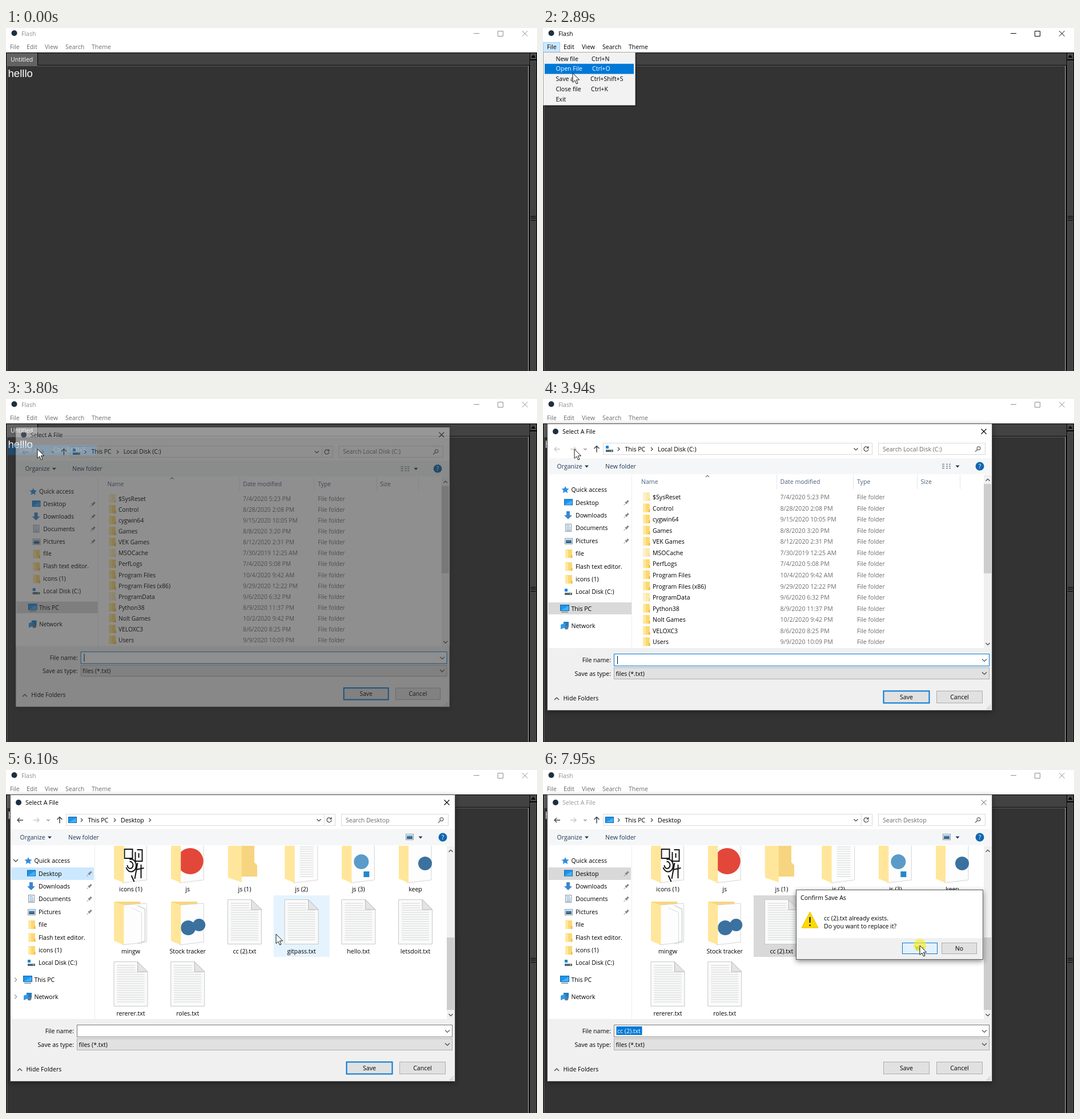
These frames come from a looping animation (930 px wide and 602 px high, 8000 ms). An HTML page:

```html
<!DOCTYPE html>
<html lang="en">
<head>
<meta charset="utf-8">
<title>Flash</title>
<style>
html, body { margin: 0; width: 100%; height: 100%; overflow: hidden; background: #333; }
svg { display: block; width: 930px; height: 602px; }
text { font: 10.55px "Open Sans", "Noto Sans", sans-serif; white-space: pre; }
#frame { filter: drop-shadow(0 2px 4px rgba(0,0,0,.4)); }
#note { filter: drop-shadow(0 3px 5px rgba(0,0,0,.45)); }
</style>
</head>
<body>
<svg id="stage" viewBox="0 0 930 602"></svg>
<script>
const LOOP = 8000;
const $ = id => document.getElementById(id);

// ---- drawing helpers ----
const text = (x, y, s, fill = '#000', more = '') => `<text x="${x}" y="${y}" fill="${fill}" ${more}>${s}</text>`;
const rect = (x, y, w, h, fill, more = '') => `<rect x="${x}" y="${y}" width="${w}" height="${h}" fill="${fill}" ${more}/>`;
const box = (x, y, w, h, fill, line, id = '') => rect(x + .5, y + .5, w - 1, h - 1, fill, `stroke="${line}" ${id && `id="${id}"`}`);
const path = (d, fill, more = '') => `<path d="${d}" fill="${fill}" ${more}/>`;
const line = (d, color, width = 1, more = '') => path(d, 'none', `stroke="${color}" stroke-width="${width}" ${more}`);
const dot = (x, y, r, fill) => `<circle cx="${x}" cy="${y}" r="${r}" fill="${fill}"/>`;
const group = (id, body, more = '') => `<g id="${id}" ${more}>${body}</g>`;
const chevron = (x, y, dir, color = '#444', s = 3) => line({
  down: `M${x - s} ${y - s / 2}l${s} ${s}l${s} ${-s}`,
  up: `M${x - s} ${y + s / 2}l${s} ${-s}l${s} ${s}`,
  right: `M${x - s / 2} ${y - s}l${s} ${s}l${-s} ${s}`
}[dir], color, 1.2);
const button = (x, y, w, h, label, id) =>
  box(x, y, w, h, '#e1e1e1', '#adadad', id) + text(x + w / 2, y + h / 2 + 4, label, '#000', 'text-anchor="middle"');

// ---- editor window ----
const menuX = { File: 7, Edit: 36, View: 68, Search: 104, Theme: 150 };
const editor = rect(0, 0, 930, 43, '#fff') +
  group('fileHot', box(0, 25, 30, 18, '#cce8ff', '#99d1ff')) +
  dot(14.5, 9, 5, '#1c2f40') +
  group('caption', text(27, 13.5, 'Flash', '') +
    line('M819 9.5h10M861.5 5.5h9v9h-9zM904 5l9.5 9.5M913.5 5l-9.5 9.5', 'currentColor')) +
  group('menuBar', Object.entries(menuX).map(([s, x]) => text(x, 37, s, '')).join('')) +
  rect(0, 43, 930, 559, '#000') + rect(0, 44, 917, 21, '#424242') + rect(0, 42, 930, 1, '#f0f0f0') +
  rect(1, 66, 915, 536, '#333') +
  line('M1.5 602V66.5H915', '#686868') + line('M915 66V602', '#b0b0b0') +
  rect(1, 44, 54, 22, '#626262') + line('M.5 66V43.5H55.5V65.5', '#000') +
  text(8, 58.5, 'Untitled', '#fff') +
  text(3.5, 85.5, 'helllo', '#fff', 'style="font:18.6px \'Liberation Sans\',Arial,sans-serif"') +
  rect(918, 44, 11, 11, '#4a4a4a') + path('M919.5 52l4-5l4 5z', '#000') +
  rect(918, 57, 11, 545, '#424242') + line('M918.5 602V57.5H929', '#5a5a5a') +
  line('M919 330.5h9M919 333.5h9M919 337.5h9', '#000');

// ---- File menu ----
const items = [['New file', 'Ctrl+N', 85], ['Open File', 'Ctrl+O', 86], ['Save as', 'Ctrl+Shift+S', 83], ['Close file', 'Ctrl+K', 84], ['Exit', '', 80]];
const itemText = (i, fill) => text(22.5, 57.5 + 17.8 * i, items[i][0], fill) + text(items[i][2], 57.5 + 17.8 * i, items[i][1], fill);
const menu = group('menu', rect(3, 45, 161, 93, '#000', 'opacity=".3"') + box(0, 42, 162, 94, '#f2f2f2', '#a5a5a5') +
  items.map((_, i) => itemText(i, '#000')).join('')) +
  items.map((_, i) => group('item' + i, rect(3, 45 + 17.8 * i, 156, 17.8, '#0078d7') + itemText(i, '#fff'))).join('');

// ---- file dialog ----
const folder = (x, y, pale) => rect(x, y, 12, 15, pale ? '#fbe9b0' : '#fcd872') +
  path(`M${x} ${y}l5 1.5v14l-5 -1z`, pale ? '#fdf1cc' : '#ffe89c') + rect(x + 10, y + 10, 2.5, 5, pale ? '#f3dc97' : '#edbb4c');
const drive = (x, y) => rect(x, y, 5, 5, '#1a86d8') + rect(x, y + 7, 13, 4, '#5d6770') + rect(x + 9, y + 8, 2, 2, '#6be36b');
const screen = (x, y, w = 15, h = 11) => box(x, y, w, h, '#1d94ea', '#0b62a8') + path(`M${x + 1} ${y + h - 1}L${x + w - 1} ${y + 2}V${y + h - 1}z`, '#45b0f7');
const picture = (x, y) => box(x, y, 14, 11, '#e9f4fb', '#8a98a4') + rect(x + 2, y + 3, 10, 4, '#4a90c8') + rect(x + 2, y + 6, 10, 3, '#3b5b70');
const icons = {
  star: (x, y) => path(`M${x + 6} ${y - 6}l2 4l4.5 .5l-3.3 3l1 4.5l-4.2 -2.3l-4.2 2.3l1 -4.5l-3.3 -3l4.5 -.5z`, '#2d8fe0'),
  desk: (x, y) => screen(x - 1, y - 6),
  down: (x, y) => path(`M${x + 3} ${y - 7}h6v7h4l-7 7l-7 -7h4z`, '#3a87cf'),
  doc: (x, y) => box(x + 1, y - 7, 11, 14, '#fff', '#8493a0') + line(`M${x + 3} ${y - 4}h6M${x + 3} ${y - 1}h7M${x + 3} ${y + 2}h7M${x + 3} ${y + 4.5}h7`, '#4f86b8'),
  pic: (x, y) => picture(x, y - 5),
  dir: (x, y) => folder(x + 1, y - 7),
  disk: (x, y) => drive(x, y - 5),
  pc: (x, y) => screen(x - 3, y - 7, 16, 11) + rect(x - 1, y + 5, 12, 2, '#8fa3b3'),
  net: (x, y) => rect(x + 3, y - 7, 9, 9, '#1f7cc4') + path(`M${x - 2} ${y - 2}l8 -3v8l-8 3z`, '#2f9bea') + dot(x + 8, y + 3, 3.5, '#5a7d96')
};
const places = [['Quick access', 159, 'star'], ['Desktop', 181.5, 'desk'], ['Downloads', 204, 'down'], ['Documents', 226, 'doc'],
  ['Pictures', 249, 'pic'], ['file', 271, 'dir'], ['Flash text editor.', 293.5, 'dir'], ['icons (1)', 316, 'dir'],
  ['Local Disk (C:)', 338, 'disk'], ['This PC', 368, 'pc'], ['Network', 398, 'net']];
const pin = y => path(`M148 ${y - 4.5}l3 3l-1.5 .5l-2 2l-.5 2.5l-4 -4l2.5 -.5l2 -2z`, '#7e858c') + line(`M144.5 ${y + 2}l-3 3`, '#7e858c');
const sidebar = rect(9, 357, 146, 21, '#d9d9d9', 'id="pcBand"') + rect(9, 171, 145, 22, '#cce8ff', 'id="deskBand"') +
  places.map(([name, y, kind], i) => {
    const child = i > 0 && i < 9;
    return icons[kind](child ? 38 : 33, y) + text(child ? 57 : 49.5, y + 4, name) + (i > 0 && i < 5 ? pin(y) : '');
  }).join('') +
  group('twisties', chevron(17, 159, 'down', '#333', 4) + chevron(17, 368, 'right', '#999', 3.5) + chevron(17, 398, 'right', '#999', 3.5));

const rows = `$SysReset|7/4/2020 5:23 PM|1
Control|8/28/2020 2:08 PM
cygwin64|9/15/2020 10:05 PM
Games|8/8/2020 3:20 PM
VEK Games|8/12/2020 2:31 PM
MSOCache|7/30/2019 12:25 AM|1
PerfLogs|7/4/2020 5:08 PM
Program Files|10/4/2020 9:42 AM
Program Files (x86)|9/29/2020 12:22 PM
ProgramData|9/6/2020 6:32 PM|1
Python38|8/9/2020 11:37 PM
Nolt Games|10/2/2020 9:42 PM
VELOXC3|8/6/2020 8:25 PM
Users|9/9/2020 10:09 PM`.split('\n').map(r => r.split('|'));
const head = '#4c607a', faint = '#6d6d6d';
const details = text(172, 149, 'Name', head) + text(415.5, 149, 'Date modified', head) + text(550, 149, 'Type', head) +
  text(661.5, 149, 'Size', head) + chevron(288, 135.5, 'up', '#777') +
  line('M409.5 133v25M543.5 133v25M655.5 133v25M730.5 133v25', '#e5e5e5') +
  rows.map(([name, date, pale], i) => {
    const y = 172 + 19.57 * i;
    return folder(175, y - 8, pale) + text(192, y + 4, name) + text(415.5, y + 4, date, faint) + text(550, y + 4, 'File folder', faint);
  }).join('');

// ---- desktop tiles ----
const PITCH = 99.7, ROW = 109, VIEW_TOP = 133, MAX_SCROLL = 351;
const ruled = (x, y, w, n, step) => Array.from({ length: n }, (_, i) => line(`M${x} ${y + i * step}h${w}`, '#cbced0', .9)).join('');
const page = path('M-29.5 7.5H12L29.5 25V85.5H-29.5z', '#fafafa', 'stroke="#c8c8c8"') +
  path('M12 7.5V25H29.5z', '#e4e4e4', 'stroke="#b8b8b8"') + ruled(-24, 14, 32, 3, 4) + ruled(-24, 26, 48, 14, 4);
const inside = {
  plain: '',
  sheet: line('M12 18l13 6v56l-13 5', '#cfd4d8', 1.5) + line('M1 22l18 8v56', '#d8dcdf'),
  doodle: line('M-11 28h14v16h-14zM-8 60a9 11 0 1 0 6 -14M-6 56a5 6 0 1 0 4 -6M8 33v16h12V29h-9M12 52l-5 28M18 55v24M9 64l14 -3M1 74l5 11M14 35v8', '#151515', 2),
  red: dot(4.5, 49, 23, '#e2473a'),
  lines: ruled(-3, 24, 24, 14, 4),
  blue: dot(5, 50, 13, '#5b9bc9') + rect(9, 67, 10, 10, '#2489ca'),
  snake: dot(17, 53, 12, '#3b719f'),
  snakes: dot(1, 57, 13, '#3b719f') + dot(20, 52, 11, '#3b719f')
};
const tab = path('M-29 11L-12 17V87L-29 80z', '#ffe69a');
const bigFolder = kind => kind === 'empty'
  ? path('M-29 11H17V51L22 56V76H-29z', '#f6d480') + path('M-29 11L-5 17V86L-29 78z', '#ffe69a')
  : path('M-29 11H17V80H-29z', '#f8d67e') + path('M-14 17L28 14V82L-14 87z', '#fdfdfd', 'stroke="#d5d5d5"') + inside[kind] + tab;
const older = Array.from({ length: 18 }, (_, i) => ['New folder' + (i ? ` (${i + 1})` : ''), i % 3 ? 'sheet' : 'empty']);
const files = older.concat([['icons (1)', 'doodle'], ['js', 'red'], ['js (1)', 'empty'], ['js (2)', 'lines'], ['js (3)', 'blue'], ['keep', 'snake'],
  ['mingw', 'sheet'], ['Stock tracker', 'snakes']], ['cc (2)', 'gitpass', 'hello', 'letsdoit', 'rererer', 'roles'].map(n => [n + '.txt', 'page']));
const CHOSEN = 26;
const tileX = i => 170 + PITCH * (i % 6), tileY = i => 135 + ROW * Math.floor(i / 6);
const tiles = files.map(([name, kind], i) => `<g transform="translate(${tileX(i) + 48.5} ${tileY(i)})">` +
  rect(-49, 0, 98, 108, 'none', `id="tile${i}"`) + (kind === 'page' ? page : bigFolder(kind)) +
  text(0, 102, name, '#000', 'text-anchor="middle"') + '</g>').join('');

const arrow = (x, dir, id) => line(`M${x - 5 * dir} 88h${10 * dir}M${x + dir} 84l${4 * dir} 4l${-4 * dir} 4`, '#c8c8c8', 1.4, id);
const crumbs = place => text(143.5, 91.5, 'This PC') + chevron(132.5, 88, 'right') + chevron(190.5, 88, 'right') + text(201, 91.5, place);
const dialog = box(7, 43, 780, 504, '#f0f0f0', '#555', 'frame') + rect(8, 44, 778, 60, '#fff') +
  dot(22, 57, 5, '#1c2f40') + group('dlgCaption', text(34, 61, 'Select A File', '') + line('M767.5 52.5l9 9M776.5 52.5l-9 9', 'currentColor', 1.1)) +
  arrow(25, -1, 'id="back"') + arrow(53, 1) + chevron(74, 88, 'down', '#888', 2.5) + line('M94 93.5v-11M89.5 87l4.5 -4.5l4.5 4.5', '#444', 1.5) +
  box(105, 77, 472, 21, '#fff', '#d9d9d9') + line('M557.5 78v19', '#d9d9d9') + chevron(548, 88, 'down', '#444', 3.5) +
  line('M569 85a4 4 0 1 0 1 3M570 83v3h-3', '#555', 1.3) +
  box(587, 77, 188, 21, '#fff', '#d9d9d9') + dot(763, 86.5, 3.5, '#666') + dot(763, 86.5, 2.3, '#fff') + line('M760.5 89l-3.5 3.5', '#666', 1.4) +
  rect(8, 104, 778, 28, '#f5f6f7') + text(24.5, 122, 'Organize', '#1e395b') + path('M73 116.5h7l-3.5 4z', '#1e395b') +
  text(109, 122, 'New folder', '#1e395b') + path('M722.5 116.5h7l-3.5 4z', '#1e395b') +
  dot(765, 118, 7.5, '#0f66b0') + text(765, 122, '?', '#fff', 'text-anchor="middle" font-weight="700"') +
  rect(8, 132, 778, 305, '#fff') + line('M155.5 133V437', '#ededed') + sidebar +
  group('drivePage', details + drive(110, 82) + crumbs('Local Disk (C:)') + text(595, 91.5, 'Search Local Disk (C:)', faint) +
    line('M699 114.5h4M699 118h4M699 121.5h4M706 114.5h3M706 118h3M706 121.5h3M711 114.5h3M711 118h3M711 121.5h3', '#7b8794', 1.4)) +
  group('deskPage', `<g clip-path="url(#view)">${group('tiles', tiles)}</g>` + screen(109, 82, 15, 11) + crumbs('Desktop') +
    text(595, 91.5, 'Search Desktop', faint) + picture(700, 112)) +
  group('tail', chevron(0, 88, 'right')) +
  rect(772, 133, 14, 304, '#f0f0f0') + chevron(779, 142, 'up', '#444', 3.5) + chevron(779, 430, 'down', '#444', 3.5) +
  rect(772, 149, 13, 119, '#cdcdcd', 'id="thumb"') +
  text(119, 462, 'File name:', '#000', 'text-anchor="end"') + box(124, 447, 658, 22, '#fff', '#0078d7', 'nameBox') +
  rect(128.5, 450, 45, 15, '#0078d7', 'id="nameMark"') + text(130, 461.5, 'cc (2).txt', '#000', 'id="nameText"') +
  rect(130, 451, 1, 14, '#000', 'id="caret"') + chevron(773, 458.5, 'down', '#555', 4) +
  text(119, 485.5, 'Save as type:', '#000', 'text-anchor="end"') + box(124, 471, 658, 21, '#e1e1e1', '#adadad') +
  text(127.5, 485.5, 'files (*.txt)') + chevron(773, 481.5, 'down', '#444', 4) +
  chevron(24, 526, 'up', '#333', 4) + text(35.5, 529, 'Hide Folders') +
  button(596, 512, 81, 22, 'Save', 'saveBtn') + button(689, 512, 81, 22, 'Cancel') +
  line('M777 543.5h2M780 543.5h2M783 543.5h1M780 540.5h2M783 540.5h1M783 537.5h1', '#b5b5b5', 1.5);

const note = box(443, 210, 328, 123, '#fff', '#5c5c5c') + rect(444, 295, 326, 37, '#f0f0f0') + text(451, 228, 'Confirm Save As') +
  path('M467.5 249L482 277H453z', '#fddb00', 'stroke="#e6bd00" stroke-linejoin="round"') + rect(466.3, 258, 2.4, 10, '#222') + dot(467.5, 272.5, 1.5, '#222') +
  text(492, 264, 'cc (2).txt already exists.') + text(492, 277.5, 'Do you want to replace it?') +
  button(629, 303, 62, 20, 'Yes', 'yesBtn') + button(698, 303, 62, 20, 'No', 'noBtn');

const pointer = group('pointer', path('M0 0V16.5L3.8 13L6.5 19L9 18L6.4 12H11.6z', '#fff', 'stroke="#000" stroke-width=".9"')) +
  group('hand', path('M-1.5 1Q0 -.5 1.5 1V8L3 7L5 8L7 8L9 9.5Q10 12 9 15L7.5 19.5H0L-5.5 12.5Q-5.5 10 -3.5 11L-1.5 13z', '#fff', 'stroke="#000"') +
    line('M1.5 8v3M4.3 8v3M7 8.5v3', '#000', .8));

$('stage').innerHTML = `<clipPath id="view"><rect x="156" y="${VIEW_TOP}" width="616" height="304"/></clipPath>` + editor + menu +
  group('dialog', dialog) + group('note', note) + '<circle id="press" r="11" fill="#f8f020" opacity=".66"/>' + group('cursor', pointer);

// ---- motion ----
const trail = [[0, 905, 640], [29, 905, 640], [30, 886, 588], [300, 420, 250], [560, 0, 52], [750, 20, 43], [1040, 20, 43], [1080, 13, 32],
  [1310, 13, 32], [1560, 140, 86], [1780, 11, 31], [2050, 11, 31], [2070, -5, 16], [2300, 14, 32], [2500, 14, 32], [2860, 52, 78], [2890, 52, 79],
  [2970, 53, 60], [3160, 55, 87], [4240, 55, 88], [4600, 98, 184], [4830, 98, 184], [5030, 330, 175], [5460, 330, 175], [5800, 420, 260],
  [6100, 473, 288], [6250, 478, 294], [6440, 420, 280], [6560, 420, 280], [6940, 638, 522], [7250, 638, 522], [7800, 660, 308], [8000, 660, 308]];
const clicks = [2330, 3430, 4640, 6460, 6980, 7930];
const clamp = v => Math.max(0, Math.min(1, v));
const ramp = (t, a, b) => clamp((t - a) / (b - a));
const easeOut = p => 1 - (1 - p) ** 3;
const show = (id, on) => $(id).style.display = on ? '' : 'none';
const set = (id, name, value) => $(id).setAttribute(name, value);
const tint = (id, color) => { set(id, 'fill', color); $(id).style.color = color; };

function cursorAt(t) {
  let i = 1;
  while (i < trail.length - 1 && trail[i][0] < t) i++;
  const [a, x, y] = trail[i - 1], [b, u, v] = trail[i];
  const p = ramp(t, a, b), e = p * p * (3 - 2 * p);
  return [x + (u - x) * e, y + (v - y) * e];
}

function popup(id, t, start, cx, cy) {
  const p = ramp(t, start, start + 200);
  const s = 1 - .0725 * (1 - easeOut(p));
  show(id, p > 0);
  set(id, 'opacity', ramp(t, start, start + 135));
  set(id, 'transform', `translate(${cx} ${cy}) scale(${s}) translate(${-cx} ${-cy})`);
}

function draw(t) {
  const [x, y] = cursorAt(t);
  const active = t >= 2350 && t < 3720, open = t >= 2400 && t < 3700, locked = t >= 7040;
  tint('caption', active ? '#000' : '#8f8f8f');
  tint('menuBar', active ? '#000' : '#6d6d6d');
  show('fileHot', open);
  show('menu', open);
  items.forEach((_, i) => {
    const hot = open && y > 45 + 17.8 * i && y <= 62.8 + 17.8 * i;
    const fading = i === 2 && t >= 3700 && t < 3850;
    show('item' + i, hot || fading);
    set('item' + i, 'opacity', fading ? 1 - ramp(t, 3700, 3850) : 1);
  });

  popup('dialog', t, 3740, 396.5, 294.5);
  const desk = t >= 4900, picked = t >= 6460;
  tint('dlgCaption', locked ? '#999' : '#000');
  show('drivePage', !desk);
  show('deskPage', desk);
  set('back', 'stroke', desk ? '#444' : '#c8c8c8');
  show('tail', t >= 4245 && !locked);
  set('tail', 'transform', `translate(${desk ? 252 : 282} 0)`);
  show('pcBand', t < 4300);
  show('deskBand', t >= 4500);
  set('deskBand', 'fill', picked ? '#d9d9d9' : t < 4640 ? '#e5f3ff' : '#cce8ff');
  set('twisties', 'opacity', ramp(t, 4250, 4450) * (1 - ramp(t, 6700, 7000)));

  const scroll = MAX_SCROLL * ramp(t, 5050, 5210);
  set('tiles', 'transform', `translate(0 ${-scroll})`);
  set('thumb', 'y', 149 + 145 * scroll / MAX_SCROLL);
  set('thumb', 'height', desk ? 127 : t < 4245 ? 157 : 119);
  files.forEach((_, i) => {
    const dx = x - tileX(i), dy = y + scroll - tileY(i);
    const hover = desk && !locked && y > VIEW_TOP && y < 437 && dx > 0 && dx < 98 && dy > 0 && dy < 108;
    const chosen = i === CHOSEN && picked;
    set('tile' + i, 'fill', chosen ? (locked ? '#d9d9d9' : '#cce8ff') : hover ? '#e5f3ff' : 'none');
  });

  const marked = t >= 7110;
  set('nameBox', 'stroke', desk ? '#7a7a7a' : '#0078d7');
  show('nameText', picked);
  set('nameText', 'fill', marked ? '#fff' : '#000');
  show('nameMark', marked);
  show('caret', t < 4640 && Math.floor((t - 3700) / 530) % 2 === 0);
  set('saveBtn', 'stroke', locked ? '#adadad' : '#0078d7');
  set('saveBtn', 'stroke-width', locked ? 1 : 2);

  popup('note', t, 7100, 607, 271.5);
  const onYes = x > 629 && x < 691 && y > 303 && y < 323;
  set('yesBtn', 'fill', onYes ? '#e5f1fb' : '#e1e1e1');
  set('yesBtn', 'stroke', onYes ? '#0078d7' : '#adadad');
  set('noBtn', 'stroke', t < 7930 ? '#0078d7' : '#adadad');

  const hand = t >= 4500 && t < 4900 && x < 155;
  show('hand', hand);
  show('pointer', !hand);
  set('cursor', 'transform', `translate(${x} ${y})`);
  show('press', clicks.some(c => t >= c && t < c + 120));
  set('press', 'cx', x);
  set('press', 'cy', y - .5);
}

const began = performance.now();
function tick() {
  draw((performance.now() - began) % LOOP);
  requestAnimationFrame(tick);
}
tick();
</script>
</body>
</html>
```
